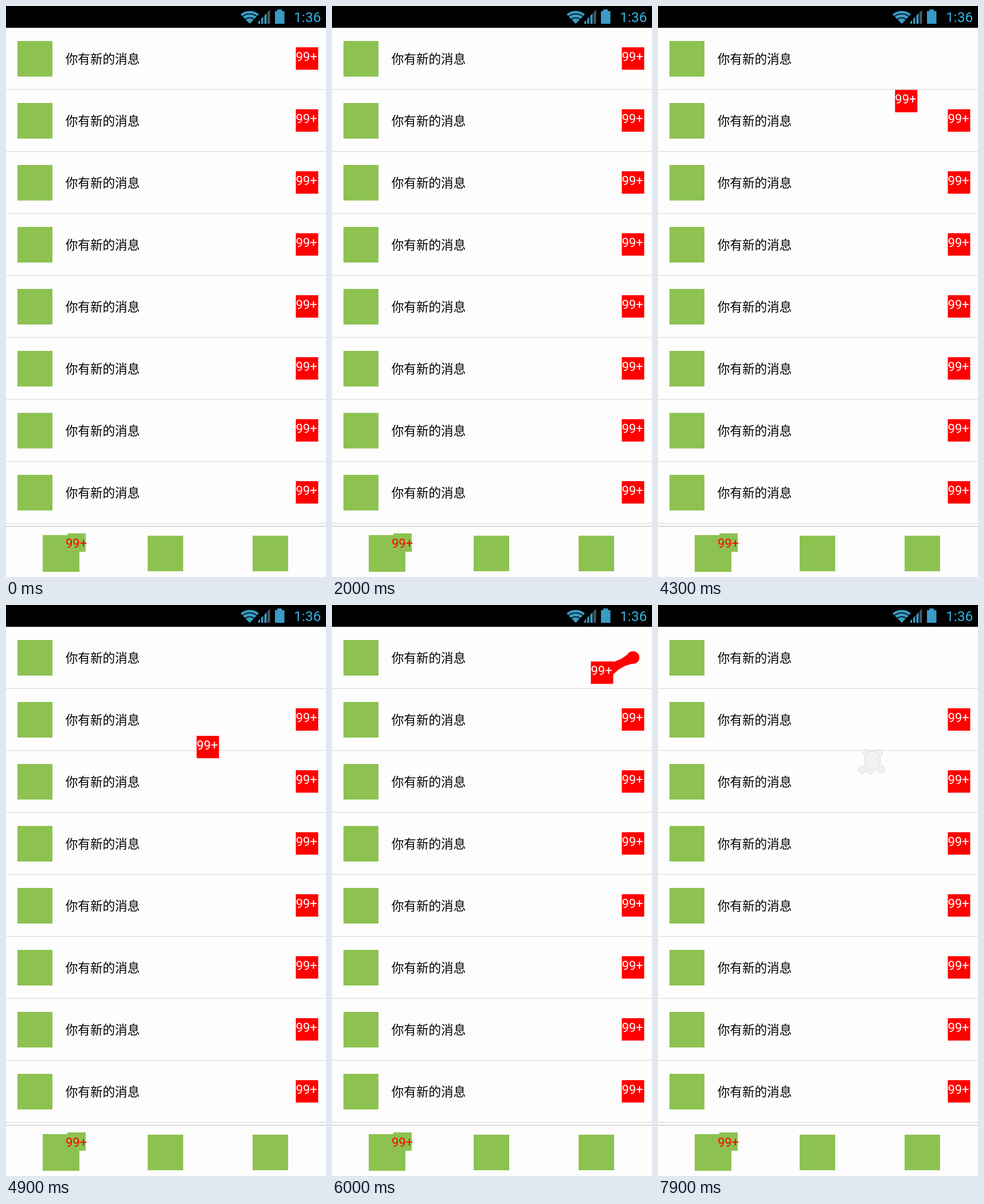
An HTML page that plays this animation: 558 by 995 pixels, repeating every 8 s.

```html
<!DOCTYPE html>
<html lang="zh">
<head>
<meta charset="utf-8">
<style>
  html, body { margin: 0; width: 100%; height: 100%; overflow: hidden; background: #fdfdfd; }
  svg { display: block; width: 100vw; height: 100vh; }
  text { font: 22px Roboto, sans-serif; }
  .label { font: 21.6px "Noto Sans CJK SC", "Noto Sans CJK", sans-serif; }
  .clock { font-size: 24.5px; }
</style>
</head>
<body>
<svg viewBox="0 0 558 995">
  <rect width="558" height="995" fill="#fdfdfd"/>
  <rect width="558" height="38"/>
  <g id="status" fill="#3a9bc4">
    <path d="M409 14.500A24 24 0 0 1 441 14.500L425 31Z"/>
    <g fill="none" stroke="#000" stroke-width="1.500">
      <path d="M412 18.500A20 20 0 0 1 438 18.500"/>
      <path d="M417 23.500A12 12 0 0 1 433 23.500"/>
    </g>
    <path d="M440 31V27.500L443 24.500V31ZM445 31V22.500L448.500 18.500V31ZM450.500 31V17L454.500 12.500V31Z"/>
    <path d="M456 31V11L460.500 6.500V31Z" fill="#4c5559"/>
    <path d="M469 9H473V6H481V9H485.500V31H469Z"/>
    <text class="clock" x="502" y="28" fill="#33b5e5">1:36</text>
  </g>
  <g id="rows"></g>
  <g id="tabs">
    <rect y="906" width="558" height="1" fill="#b9b9b9"/>
    <g fill="#8dc251">
      <rect x="64" y="922" width="64" height="64"/>
      <rect x="107" y="919" width="32" height="32"/>
      <rect x="247" y="923" width="62" height="62"/>
      <rect x="430" y="923" width="62" height="62"/>
    </g>
    <text x="104" y="944" fill="#f00">99+</text>
  </g>
  <g id="tail" fill="#f00">
    <circle id="anchor"/>
    <path id="neck"/>
  </g>
  <g id="badge"></g>
  <g id="puff" fill="#f1f1f1" stroke="#dadada">
    <circle cx="363" cy="257" r="5.500"/>
    <circle cx="386" cy="257" r="5.500"/>
    <circle cx="356" cy="287" r="6.500"/>
    <circle cx="389" cy="286" r="6.500"/>
    <circle cx="370" cy="289" r="5.500"/>
    <ellipse cx="374" cy="271" rx="14" ry="17"/>
  </g>
</svg>
<script>
const LOOP = 8000, STEP = 100, PUFF_TIME = 7900;
const SIZE = 39, ROW = 108, ROWS = 8;
const HOME = [505.4, 72];
const FULL_RADIUS = 19.5, SHRINK = 0.14, SNAP_DISTANCE = 110;

// Easings take progress and the length of the move.
const steady = t => t;
const smooth = t => t * t * (3 - 2 * t);
const settle = t => 1 - (1 - t) ** 2.4;
const spring = (t, length) => {
  const tension = length / 28, u = t - 1;
  return u * u * ((tension + 1) * u + tension) + 1;
};

// The finger's path; each move begins where the one before it ended.
const moves = [
  { start: 600, end: 1100, to: [440.4, 144.4], ease: settle },
  { start: 1700, end: 2000, to: HOME, ease: spring },
  { start: 3100, end: 3600, to: [425.4, 136], ease: settle },
  { start: 4100, end: 4400, to: [412.4, 147], ease: settle },
  { start: 4700, end: 4900, to: [332.4, 228], ease: steady },
  { start: 4900, end: 5100, to: [251.4, 378], ease: steady },
  { start: 5100, end: 5600, to: [417, 190], ease: smooth },
  { start: 5600, end: 6000, to: [451.4, 98.4], ease: steady },
  { start: 6200, end: 6500, to: HOME, ease: spring },
  { start: 7100, end: 7400, to: [392.6, 211.2], ease: steady },
  { start: 7400, end: 7600, to: [354, 257], ease: settle }
];

const $ = id => document.getElementById(id);
const show = (id, visible) => { $(id).style.display = visible ? '' : 'none'; };
const badgeMarkup = (x, y) =>
  `<rect x="${x}" y="${y}" width="${SIZE}" height="${SIZE}" fill="#f00"/>
   <text x="${x}" y="${y + 24}" fill="#fff">99+</text>`;

function buildRow(_, i) {
  const y = 38 + i * ROW;
  return `<rect x="20" y="${y + 23}" width="61" height="62" fill="#8dc251"/>
    <text class="label" x="103.700" y="${y + 62}">你有新的消息</text>
    <rect y="${y + 107}" width="558" height="1" fill="#d6d6d6"/>
    ${i ? badgeMarkup(HOME[0], HOME[1] + i * ROW) : ''}`;
}

$('rows').innerHTML = Array.from({ length: ROWS }, buildRow).join('');
$('badge').innerHTML = badgeMarkup(0, 0);

function positionAt(time) {
  let [x, y] = HOME;
  for (const { start, end, to, ease } of moves) {
    if (time <= start) break;
    const dx = to[0] - x, dy = to[1] - y;
    const progress = ease(Math.min((time - start) / (end - start), 1), Math.hypot(dx, dy));
    x += dx * progress;
    y += dy * progress;
  }
  return [x, y];
}

function drawTail(x, y) {
  const [ax, ay] = HOME.map(v => v + SIZE / 2);
  const bx = x + SIZE / 2, by = y + SIZE / 2;
  const distance = Math.hypot(bx - ax, by - ay);
  const visible = distance > 0.1 && distance < SNAP_DISTANCE;
  show('tail', visible);
  if (!visible) return;

  const radius = FULL_RADIUS - SHRINK * distance;
  const nx = (ay - by) / distance, ny = (bx - ax) / distance;
  const side = (cx, cy, r) => `${cx + nx * r} ${cy + ny * r}`;
  const middle = `${(ax + bx) / 2} ${(ay + by) / 2}`;
  $('anchor').setAttribute('cx', ax);
  $('anchor').setAttribute('cy', ay);
  $('anchor').setAttribute('r', radius);
  $('neck').setAttribute('d',
    `M${side(ax, ay, radius)}Q${middle} ${side(bx, by, FULL_RADIUS)}` +
    `L${side(bx, by, -FULL_RADIUS)}Q${middle} ${side(ax, ay, -radius)}Z`);
}

function render(elapsed) {
  const time = Math.floor((elapsed % LOOP) / STEP) * STEP;
  const [x, y] = positionAt(time);
  const burst = time >= PUFF_TIME;
  drawTail(x, y);
  $('badge').setAttribute('transform', `translate(${x} ${y})`);
  show('badge', !burst);
  show('puff', burst);
}

const begin = performance.now();
function frame() {
  render(performance.now() - begin);
  requestAnimationFrame(frame);
}
frame();
</script>
</body>
</html>
```
